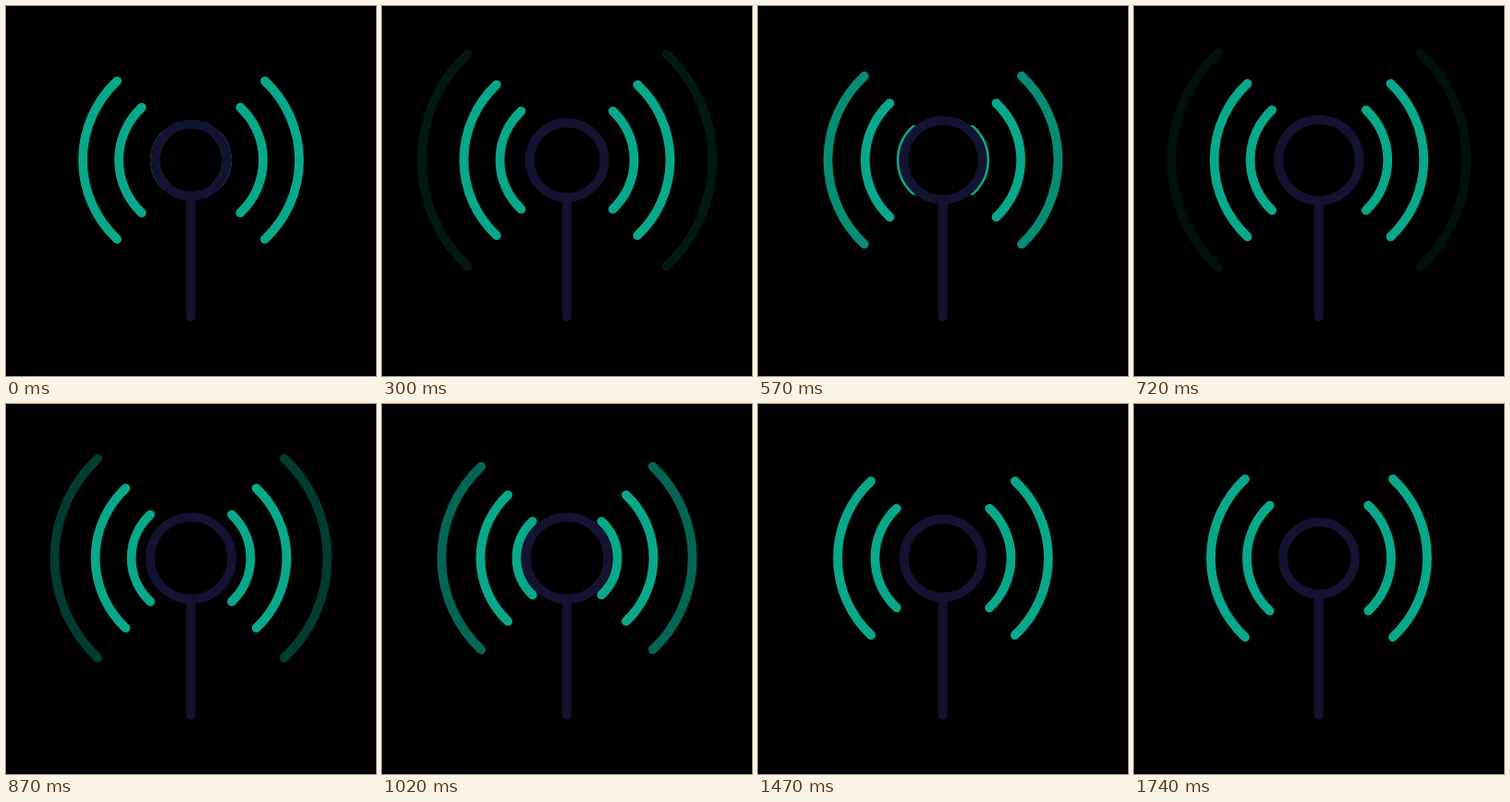
Write an HTML page that moves like this. It is 400 by 400 pixels and loops after 3.03 s.

```html
<!DOCTYPE html>
<html lang="en">
<head>
<meta charset="utf-8">
<title>Broadcast</title>
<style>
  html, body { margin: 0; width: 100%; height: 100%; overflow: hidden; background: #000; }
  svg { display: block; width: 100vw; height: 100vh; }
</style>
</head>
<body>
<svg viewBox="0 0 400 400" fill="none" stroke-width="9.8" stroke-linecap="round">
  <g stroke="#08a88a">
    <path class="wave"/>
    <path class="wave"/>
    <path class="wave"/>
  </g>
  <g stroke="#121331">
    <line id="mast" x1="199.9" x2="199.9" y2="336"/>
    <circle id="ring" cx="200" cy="166.6"/>
  </g>
</svg>
<script>
const LOOP = 3030, STEP = 30;
const CX = 200, CY = 166.6;
const RADII = [39, 78, 117, 163.8];
const FIRST = 337, PULSE = 201, PULSES = 5;
const END = FIRST + PULSE * (PULSES - 1);
const SPREAD = 46.9 * Math.PI / 180;

const waves = [...document.querySelectorAll('.wave')];
const ring = document.getElementById('ring');
const mast = document.getElementById('mast');

const clamp = x => Math.min(1, Math.max(0, x));
const lerp = (a, b, u) => a + (b - a) * u;
const smooth = u => u * u * (3 - 2 * u);
const easeOut = u => 1 - (1 - u) ** 2;
const span = (t, a, b) => clamp((t - a) / (b - a));

// Pulses emitted so far: a soft start, then a steady rate.
const pulsesAt = t => t < FIRST ? (t / FIRST) ** 1.3 : 1 + (t - FIRST) / PULSE;

// Overshoot, swing back, then rest.
function settle(t, rest, high, tHigh, low, tLow, tRest) {
  if (t < tHigh) return lerp(rest, high, easeOut(span(t, END, tHigh)));
  if (t < tLow) return lerp(high, low, smooth(span(t, tHigh, tLow)));
  return lerp(low, rest, smooth(span(t, tLow, tRest)));
}

function ringRadius(t) {
  const swell = smooth(span(t, 0, 900));
  const fall = smooth(span(t, 1140, 1740)) ** 1.7;
  return 39 + 5.3 * (swell - fall);
}

function setWave(el, r, opacity) {
  const dx = r * Math.cos(SPREAD), dy = r * Math.sin(SPREAD);
  const side = (k, sweep) =>
    `M${CX + k * dx} ${CY - dy}A${r} ${r} 0 0 ${sweep} ${CX + k * dx} ${CY + dy}`;
  el.setAttribute('d', side(-1, 0) + side(1, 1));
  el.setAttribute('opacity', opacity);
}

function draw(t) {
  if (t < END) {
    const p = pulsesAt(t) % 1;
    waves.forEach((el, i) =>
      setWave(el, lerp(RADII[i], RADII[i + 1], p), i === 2 ? 1 - p : 1));
  } else {
    setWave(waves[0], RADII[0], 0);
    setWave(waves[1], settle(t, 78, 84, 1240, 73.5, 1460, 1740), 1);
    setWave(waves[2], settle(t, 117, 129, 1200, 113, 1410, 1600), 1);
  }
  const r = ringRadius(t);
  ring.setAttribute('r', r);
  mast.setAttribute('y1', CY + r);
}

function tick(now) {
  draw(Math.floor((now % LOOP) / STEP) * STEP);
  requestAnimationFrame(tick);
}

draw(0);
requestAnimationFrame(tick);
</script>
</body>
</html>
```
